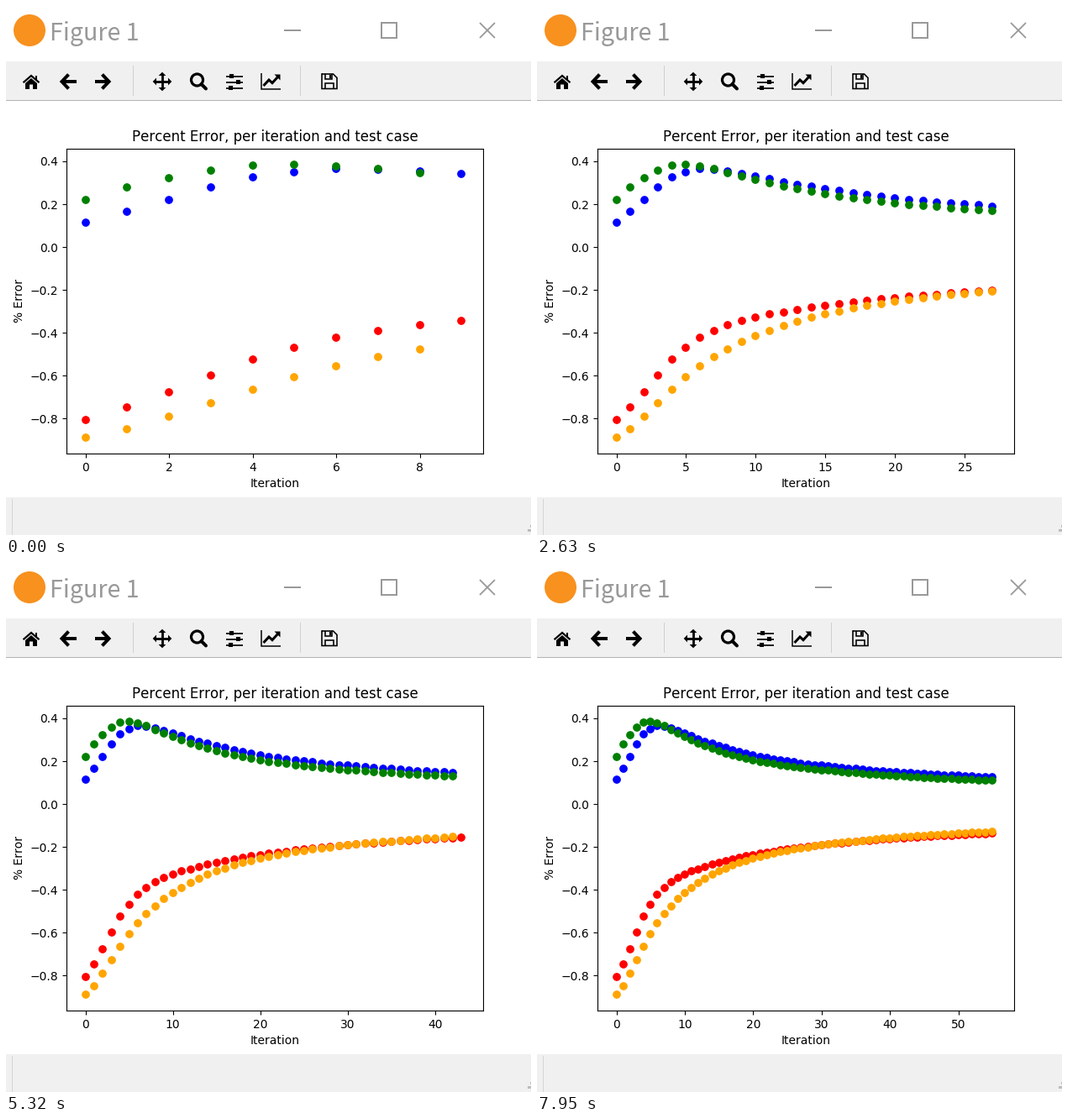
Animation, 625 px wide and 630 px high, one loop 8 s. Source, as a matplotlib script:

```python
import numpy as np
import matplotlib.pyplot as plt
from matplotlib.animation import FuncAnimation
from matplotlib.patches import Circle, Polygon, Rectangle
from matplotlib.transforms import IdentityTransform

W, H, DPI = 625, 630, 100
LOOP, STEP = 8000, 40
PX = 72 / DPI  # points per pixel

plt.rcParams["font.family"] = "DejaVu Sans"
plt.rcParams["text.kerning_factor"] = 6  # classic letter spacing
fig = plt.figure(figsize=(W / DPI, H / DPI), dpi=DPI, facecolor="white")

# ---- window frame, drawn in pixels with y pointing down ----
win = fig.add_axes([0, 0, 1, 1], zorder=-1)
win.set_xlim(0, W)
win.set_ylim(H, 0)
win.axis("off")

GREY, BAR, INK = "#999999", "#f0f0f0", "black"


def rect(x0, y0, x1, y1, color=INK):
    win.add_patch(Rectangle((x0, y0), x1 - x0, y1 - y0, fc=color, lw=0))


def line(points, width, color=INK, cap="butt"):
    xs, ys = zip(*points)
    win.plot(xs, ys, color=color, lw=width * PX, solid_capstyle=cap,
             solid_joinstyle="miter")


def poly(points):
    win.add_patch(Polygon(points, closed=True, fc=INK, lw=0))


def title_bar():
    win.add_patch(Circle((28, 29), 19, fc="#f8911e", lw=0))
    win.text(51.5, 41, "Figure 1", family="Noto Sans CJK JP", size=28.7 * PX,
             color=GREY, va="baseline")
    rect(331, 28, 351, 30, GREY)
    line([(447, 20), (465, 20), (465, 38), (447, 38), (447, 19)], 2, GREY)
    line([(564, 20), (582, 38)], 1.8, GREY)
    line([(564, 38), (582, 20)], 1.8, GREY)


def home():
    line([(20.5, 91.2), (30, 83), (39.5, 91.2)], 2.2)
    rect(34.5, 82.5, 37.3, 88)
    poly([(23, 92), (30, 86), (37, 92), (37, 99), (32, 99),
          (32, 93.5), (28, 93.5), (28, 99), (23, 99)])


def arrow(cx, d):
    line([(cx - 9.5 * d, 90), (cx + 7 * d, 90)], 4)
    line([(cx - 0.5 * d, 81.5), (cx + 7.5 * d, 90), (cx - 0.5 * d, 98.5)], 4)


def move():
    cx, cy, tip, base, half = 186, 90, 11.3, 7, 4.4
    for dx, dy in ((1, 0), (-1, 0), (0, 1), (0, -1)):
        line([(cx, cy), (cx + 8 * dx, cy + 8 * dy)], 2.8)
        poly([(cx + tip * dx, cy + tip * dy),
              (cx + base * dx + half * dy, cy + base * dy + half * dx),
              (cx + base * dx - half * dy, cy + base * dy - half * dx)])


def lens():
    win.add_patch(Circle((227.5, 88), 7, fill=False, ec=INK, lw=3.2 * PX))
    line([(232.5, 93), (238, 98.5)], 4, cap="round")


def sliders():
    for y, knob in ((83.5, 268.5), (90.5, 276.5), (97.5, 267.5)):
        line([(262, y), (282, y)], 1.7)
        rect(knob - 3.4, y - 2.6, knob + 3.4, y + 2.6, BAR)
        rect(knob - 2.3, y - 2.6, knob + 2.3, y + 2.6)


def chart():
    line([(304, 80), (304, 98.5), (327, 98.5)], 1.5)
    line([(306.5, 95), (313, 88), (317, 91.7), (323.5, 84.5)], 3)
    poly([(326.5, 81.5), (319.5, 81.5), (326.5, 88.5)])


def disk():
    line([(376, 81), (389.5, 81), (394, 85.5), (394, 98.5),
          (376, 98.5), (376, 80.2)], 1.6)
    line([(379.7, 81), (379.7, 87), (388.3, 87), (388.3, 81)], 1.6)
    rect(384.5, 82, 387, 86)
    line([(379.7, 98.5), (379.7, 92), (390.3, 92), (390.3, 98.5)], 1.6)


def toolbar():
    rect(0, 66, W, 112, BAR)
    rect(0, 112, W, 113, "#b4b4b4")
    for x in (151, 350):
        rect(x, 71, x + 1, 107, "#cfcfcf")
    home()
    arrow(74, -1)
    arrow(115, 1)
    for icon in (move, lens, sliders, chart, disk):
        icon()


def status_bar():
    rect(0, 585, W, H, BAR)
    rect(7, 587, 8, H, "#d5d5d5")
    rect(621, 623, W, 626, "#bcbcbc")
    rect(624, 618, W, 621, "#bcbcbc")


title_bar()
toolbar()
status_bar()

# ---- plot ----
LEFT, TOP, WIDTH, HEIGHT = 72, 169.64, 496, 363.44
ax = fig.add_axes([LEFT / W, 1 - (TOP + HEIGHT) / H, WIDTH / W, HEIGHT / H])
ax.set_title("Percent Error, per iteration and test case")
ax.set_xlabel("Iteration")
ax.set_ylabel("% Error")
ax.set_ylim(-0.963, 0.46)

MARGIN = WIDTH / 22           # 5 % of the data width on each side
SPAN = WIDTH - 2 * MARGIN - 3  # first to last dot, in pixels

# error of each case at a few iterations
KEYS = [0, 2, 4, 6, 9, 14, 22, 35, 55]
CASES = {
    "red": [-.807, -.678, -.525, -.423, -.345, -.283, -.226, -.176, -.138],
    "blue": [.113, .220, .325, .363, .340, .281, .215, .163, .125],
    "green": [.219, .320, .380, .376, .329, .257, .192, .144, .109],
    "orange": [-.890, -.792, -.667, -.556, -.443, -.330, -.238, -.174, -.130],
}


def smooth(x, keys, values):
    """Cubic Hermite curve through the key points."""
    keys, values = np.asarray(keys), np.asarray(values)
    slope = np.gradient(values, keys, edge_order=2)
    i = np.clip(np.searchsorted(keys, x, side="right") - 1, 0, len(keys) - 2)
    h = keys[i + 1] - keys[i]
    s = (x - keys[i]) / h
    rise = values[i + 1] - values[i]
    bend = (1 - s) * (h * slope[i] - rise) - s * (h * slope[i + 1] - rise)
    return values[i] + s * rise + s * (1 - s) * bend


def log_axis(i):
    return np.log(np.asarray(i) + 4)


its = np.arange(KEYS[-1] + 1)
curves = [smooth(log_axis(its), log_axis(KEYS), v) for v in CASES.values()]
# plotting order: all four cases of one iteration, then the next
points = np.column_stack([np.repeat(its, len(CASES)),
                          np.column_stack(curves).ravel()])
colors = list(CASES) * len(its)
dots = ax.scatter([], [], transform=IdentityTransform())

# ---- timing: steady redraws, with ever fewer new dots each ----
REDRAW, OFFSET = 77.25, 70
PACE_MS = [0, 1380, 2630, 3630, 4550, 6100, 7950]
PACE_DOTS = [38, 79, 112, 136, 157, 190, 224]


def update(frame):
    t = frame * STEP + 30
    shown = max(0, OFFSET + REDRAW * np.floor((t - OFFSET) / REDRAW))
    n = int(round(np.interp(shown, PACE_MS, PACE_DOTS)))
    unit = SPAN / points[n - 1, 0] if n % 4 == 0 else SPAN / ((n - 1) // 4)
    ax.set_xlim(-MARGIN / unit, (WIDTH - MARGIN) / unit)
    # dots sit on whole pixels
    dots.set_offsets(np.round(ax.transData.transform(points[:n])))
    dots.set_color(colors[:n])
    return dots,


anim = FuncAnimation(fig, update, frames=LOOP // STEP, interval=STEP,
                     init_func=lambda: update(0), repeat=True,
                     repeat_delay=0, blit=False)
plt.show()
```
